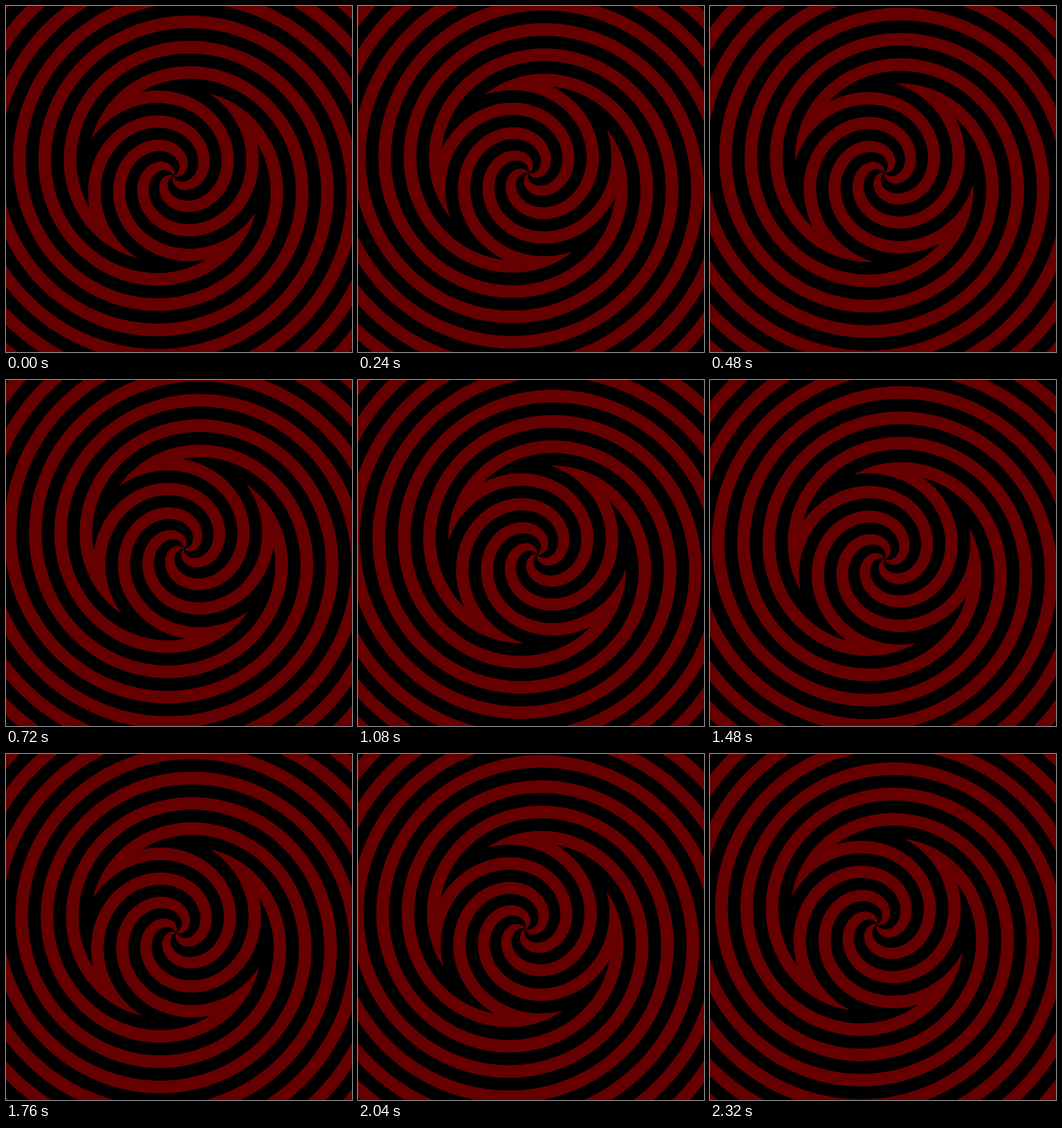
An HTML page with a canvas for the animation above (2360 ms loop, 500 px wide and 500 px high).

```html
<!DOCTYPE html>
<html lang="en">
<head>
<meta charset="utf-8">
<title>Spiral</title>
<style>
  html, body { margin: 0; width: 100%; height: 100%; overflow: hidden; background: #000; }
  canvas { display: block; }
</style>
</head>
<body>
<canvas id="stage" width="500" height="500"></canvas>
<script>
const ctx = document.getElementById('stage').getContext('2d');

const STEP_MS = 40, STEPS = 59;
const ARMS = 4;
const TURN = Math.PI * 2;
const PITCH = 36.85;                  // radial distance between arms
const FOLD = 129.8;                   // radius where the spiral reverses
const R_MAX = 410;
const START = 23.9 * Math.PI / 180;   // clockwise from the top
const PIVOT = { x: 250, y: 249.9 };
const OFFSET = { x: -8, y: -4.4 };    // spiral centre relative to the pivot

function edgePoint(r, base) {
  const a = START + base + TURN / ARMS * Math.abs(r - FOLD) / PITCH;
  return [r * Math.sin(a), -r * Math.cos(a)];
}

function buildArms() {
  const path = new Path2D();
  for (let n = 0; n < ARMS; n++) {
    const base = n * TURN / ARMS;
    path.moveTo(0, 0);
    for (let r = 0; r <= R_MAX; r += 0.5) path.lineTo(...edgePoint(r, base));
    for (let r = R_MAX; r >= 0; r -= 0.5) path.lineTo(...edgePoint(r, base + TURN / ARMS / 2));
    path.closePath();
  }
  return path;
}

const arms = buildArms();

function draw(now) {
  const step = Math.floor(now / STEP_MS) % STEPS;
  ctx.setTransform(1, 0, 0, 1, 0, 0);
  ctx.fillStyle = '#000';
  ctx.fillRect(0, 0, 500, 500);
  ctx.translate(PIVOT.x, PIVOT.y);
  ctx.rotate(TURN * step / STEPS);
  ctx.translate(OFFSET.x, OFFSET.y);
  ctx.fillStyle = '#660000';
  ctx.fill(arms);
}

let origin = null;
function tick(now) {
  if (origin === null) origin = now;
  draw(Math.max(0, now - origin));
  requestAnimationFrame(tick);
}
draw(0);
requestAnimationFrame(tick);
</script>
</body>
</html>
```
